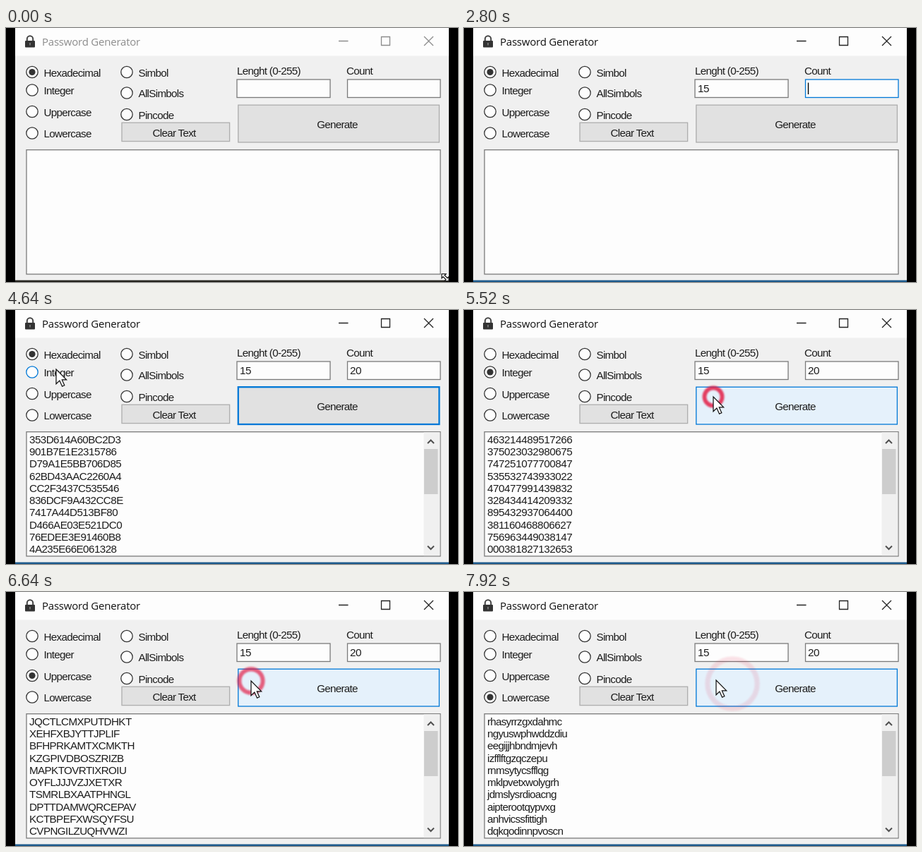
An HTML page that plays this animation: 640x360 px, repeating every 8000 ms.

```html
<!DOCTYPE html>
<html lang="en">
<head>
<meta charset="utf-8">
<title>Password Generator</title>
<style>
html, body { margin: 0; width: 100%; height: 100%; overflow: hidden; background: #000; }
svg { display: block; width: 640px; height: 360px; }
text { font: 15.2px "Liberation Sans", Arial, sans-serif; letter-spacing: -.7px; fill: #1c1c1c; white-space: pre; }
.value { letter-spacing: -.42px; }
#title { font: 15px "Open Sans", "Noto Sans", sans-serif; letter-spacing: -.22px; fill: #111; }
#chrome { fill: none; stroke: #222; stroke-width: 1.3; }
#edge { fill: #1d5a8c; }
.idle #title { fill: #8c8c8c; }
.idle #chrome { stroke: #8c8c8c; }
.idle #edge { fill: #25241f; }
.radio circle { fill: #fdfdfd; stroke: #333; stroke-width: 1.3; }
.radio .dot { fill: #333; stroke: none; visibility: hidden; }
.radio.on .dot { visibility: visible; }
.radio.hot circle { stroke: #0078d7; }
.radio.hot .dot { fill: #0078d7; stroke: none; }
.field { fill: #fdfdfd; stroke: #7a7a7a; stroke-width: 1.3; }
.field.hot { stroke: #222; }
.field.focus { stroke: #0078d7; }
.button rect { fill: #e1e1e1; stroke: #adadad; stroke-width: 1.3; }
.button.focus rect { stroke: #0078d7; stroke-width: 2.3; }
.button.hot rect { fill: #e5f1fb; stroke: #0078d7; stroke-width: 1.3; }
.button text { text-anchor: middle; }
</style>
</head>
<body>
<svg id="stage" viewBox="0 0 640 360">
  <filter id="soft" x="-50%" y="-50%" width="200%" height="200%"><feGaussianBlur stdDeviation="1"/></filter>
  <rect width="640" height="360"/>
  <rect id="edge" x="13" y="357" width="614" height="3"/>
  <rect x="13" y="39" width="614" height="318.5" fill="#f0f0f0"/>
  <rect x="13" width="614" height="39.5" fill="#fdfdfd"/>
  <path d="M29.8 19v-3.5a4.2 4.2 0 0 1 8.4 0v3.5" fill="none" stroke="#444" stroke-width="2"/>
  <rect x="27" y="18" width="14" height="9.5" rx="1" fill="#333"/>
  <path d="M34 21v3.5" stroke="#888" stroke-width="1.5"/>
  <text id="title" x="51" y="24.5">Password Generator</text>
  <path id="chrome" d="M471 18.5h13.5M531.5 12.5h12v12h-12zM592 12l13 13M605 12l-13 13"/>
  <g id="form"></g>
  <text x="327" y="66">Lenght (0-255)</text>
  <text x="482" y="66">Count</text>
  <text id="length" class="value" x="331" y="91"></text>
  <text id="count" class="value" x="487" y="91"></text>
  <rect id="caret" y="77.5" width="1.4" height="16.5"/>
  <g id="list"></g>
  <g id="bar">
    <rect x="591.5" y="173.2" width="22.8" height="175" fill="#f0f0f0"/>
    <rect x="592" y="197" width="19.5" height="64" fill="#cdcdcd"/>
    <path d="M597 189l4.5-4.5 4.5 4.5M597 334.5l4.5 4.5 4.5-4.5" fill="none" stroke="#505050" stroke-width="2"/>
  </g>
  <circle id="ring" fill="none" stroke="#e3143f" filter="url(#soft)"/>
  <g id="pointer">
    <path data-kind="arrow" transform="scale(1.22)" d="M0 0v17l4-3.8 3 6.6 2.7-1.2-2.9-6.4h5.2z" fill="#fff" stroke="#111"/>
    <path data-kind="beam" d="M-4 -10h3.2l.8.8.8-.8H4M-4 10h3.2l.8-.8.8.8H4M0-9.5v19" fill="none" stroke="#111" stroke-width="1.6"/>
    <path data-kind="size" d="M-5-4.5h6l-2 2 4 4 2-2v6h-6l2-2-4-4-2 2z" fill="#fff" stroke="#111" stroke-width="1.2"/>
  </g>
</svg>
<script>
const LOOP = 8000, STEP = 80, BLINK = 530;
const $ = id => document.getElementById(id);

function add(parent, tag, attrs, text) {
  const el = document.createElementNS("http://www.w3.org/2000/svg", tag);
  for (const key in attrs) el.setAttribute(key, attrs[key]);
  if (text) el.textContent = text;
  parent.append(el);
  return el;
}

const controls = {};

function radio(name, x, y, base) {
  const el = add($("form"), "g", { class: "radio" });
  add(el, "circle", { cx: x, cy: y, r: 8.2 });
  add(el, "circle", { cx: x, cy: y, r: 4.6, class: "dot" });
  add(el, "text", { x: x + 16.5, y: base }, name);
  controls[name] = { el, radio: true, box: [x - 9, y - 11, 105, 22] };
}

function button(name, x, y, width, height, mid, base) {
  const el = add($("form"), "g", { class: "button" });
  add(el, "rect", { x, y, width, height });
  add(el, "text", { x: mid, y: base }, name);
  controls[name] = { el, box: [x, y, width, height] };
}

function field(name, x, y, width, height) {
  const el = add($("form"), "rect", { x, y, width, height, class: "field" });
  controls[name] = { el, field: true, box: [x, y, width, height] };
}

radio("Hexadecimal", 37, 62.5, 68.5);
radio("Integer", 37, 88, 94);
radio("Uppercase", 37, 118.5, 124.5);
radio("Lowercase", 37, 149, 155);
radio("Simbol", 171, 62.5, 68.5);
radio("AllSimbols", 171, 92, 98);
radio("Pincode", 171, 122.5, 128.5);
button("Clear Text", 164, 134.2, 152.6, 26.4, 238, 153.5);
button("Generate", 328.8, 109.2, 284.6, 52.8, 469, 141.5);
field("Length", 327, 73, 132, 25.5);
field("Count", 483.5, 73, 131.5, 25.5);
field("Output", 29, 172.7, 586, 176.2);

const output = {
  Hexadecimal: [-.55, `353D614A60BC2D3 901B7E1E2315786 D79A1E5BB706D85 62BD43AAC2260A4 CC2F3437C535546
    836DCF9A432CC8E 7417A44D513BF80 D466AE03E521DC0 76EDEE3E91460B8 4A235E66E061328`],
  Integer: [-.42, `463214489517266 375023032980675 747251077700847 535532743933022 470477991439832
    328434414209332 895432937064400 381160468806627 756963449038147 000381827132653`],
  Uppercase: [-.6, `JQCTLCMXPUTDHKT XEHFXBJYTTJPLIF BFHPRKAMTXCMKTH KZGPIVDBOSZRIZB MAPKTOVRTIXROIU
    OYFLJJJVZJXETXR TSMRLBXAATPHNGL DPTTDAMWQRCEPAV KCTBPEFXWSQYFSU CVPNGILZUQHVWZI`],
  Lowercase: [-.74, `rhasyrrzgxdahmc ngyuswphwddzdiu eegijjhbndmjevh izfflftgzqczepu rnmsytycsfflqg
    mklpvetxwolygrh jdmslysrdioacng aipterootqypvxg anhvicssfittigh dqkqodinnpvoscn`]
};
for (const name in output) {
  const [gap, words] = output[name];
  const g = output[name] = add($("list"), "g", {});
  words.split(/\s+/).forEach((word, i) =>
    add(g, "text", { x: 33, y: 188.9 + i * 17.25, style: `letter-spacing:${gap}px` }, word));
}

// time, x, y of the pointer
const path = [
  [0, 622, 353], [160, 622, 353], [800, 421, 82], [2000, 421, 82], [2240, 570, 86],
  [3600, 570, 86], [3920, 400, 128], [4160, 400, 128], [4640, 71, 84], [4720, 68, 86],
  [4960, 68, 86], [5400, 353, 123], [5640, 353, 123], [5980, 70, 117], [6140, 70, 117],
  [6480, 347, 126], [6720, 347, 126], [7040, 74, 147], [7240, 74, 147], [7620, 380, 130],
  [7760, 380, 130], [7920, 357, 125]
];
const clicks = [
  [920, "Length"], [2290, "Count"], [3990, "Generate"], [4780, "Integer"], [5480, "Generate"],
  [6040, "Uppercase"], [6565, "Generate"], [7110, "Lowercase"], [7684, "Generate"]
];
const keys = [
  [1680, "Length", "1"], [1840, "Length", "5"], [2960, "Count", "2"], [3120, "Count", "0"]
];
const hidden = [[1680, 2000], [2720, 3600]];

function pointerAt(t) {
  const i = path.findIndex(p => p[0] > t);
  if (i < 0) return path[path.length - 1].slice(1);
  const [t0, x0, y0] = path[i - 1], [t1, x1, y1] = path[i];
  const u = (t - t0) / (t1 - t0), e = u * u * (3 - 2 * u);
  return [x0 + (x1 - x0) * e, y0 + (y1 - y0) * e];
}

function inside(x, y, [left, top, width, height]) {
  return x >= left && x <= left + width && y >= top && y <= top + height;
}

const show = (el, on) => { el.style.visibility = on ? "visible" : "hidden"; };

function stateAt(t) {
  const s = { focus: "", choice: "Hexadecimal", shown: "", Length: "", Count: "", touched: 0, click: -1 };
  for (const [time, name] of clicks) {
    if (time > t) break;
    s.focus = name;
    s.click = s.touched = time;
    if (controls[name].radio) s.choice = name;
    if (name === "Generate") s.shown = s.choice;
  }
  for (const [time, name, char] of keys) {
    if (time > t) break;
    s[name] += char;
    s.touched = Math.max(s.touched, time);
  }
  return s;
}

function drawRing(t, click) {
  const age = t - click, on = click >= 0 && age < 300;
  show($("ring"), on);
  if (!on) return;
  const [x, y] = pointerAt(click), ring = $("ring");
  ring.setAttribute("cx", x);
  ring.setAttribute("cy", y);
  ring.setAttribute("r", 8 + age * .115);
  ring.setAttribute("stroke-width", 5.5 + age * .007);
  ring.setAttribute("opacity", (1 - age / 300) ** 1.4);
}

function drawPointer(t, x, y, hot) {
  const visible = !hidden.some(([from, to]) => t >= from && t < to);
  const overBar = hot === "Output" && x > 591;
  const kind = x > 615 && y > 345 ? "size" : hot && controls[hot].field && !overBar ? "beam" : "arrow";
  $("pointer").setAttribute("transform", `translate(${x} ${y})`);
  for (const el of $("pointer").children) show(el, visible && el.dataset.kind === kind);
}

function render(t) {
  const s = stateAt(t), [x, y] = pointerAt(t);
  const hot = Object.keys(controls).find(name => inside(x, y, controls[name].box));
  $("stage").classList.toggle("idle", !s.focus);
  for (const name in controls) {
    const list = controls[name].el.classList;
    list.toggle("hot", name === hot && name !== "Output");
    list.toggle("focus", name === s.focus);
    list.toggle("on", name === s.choice);
  }
  $("length").textContent = s.Length;
  $("count").textContent = s.Count;
  for (const name in output) output[name].style.display = name === s.shown ? "" : "none";
  show($("bar"), s.shown);

  const typing = s.focus === "Length" || s.focus === "Count";
  show($("caret"), typing && Math.floor((t - s.touched) / BLINK) % 2 === 0);
  if (typing) $("caret").setAttribute("x", (s.focus === "Length" ? 330.6 : 486.8) + s[s.focus].length * 8.2);

  drawRing(t, s.click);
  drawPointer(t, x, y, hot);
}

const start = performance.now();
function tick() {
  const t = (performance.now() - start) % LOOP;
  render(Math.floor(t / STEP) * STEP);
  requestAnimationFrame(tick);
}
tick();
</script>
</body>
</html>
```
